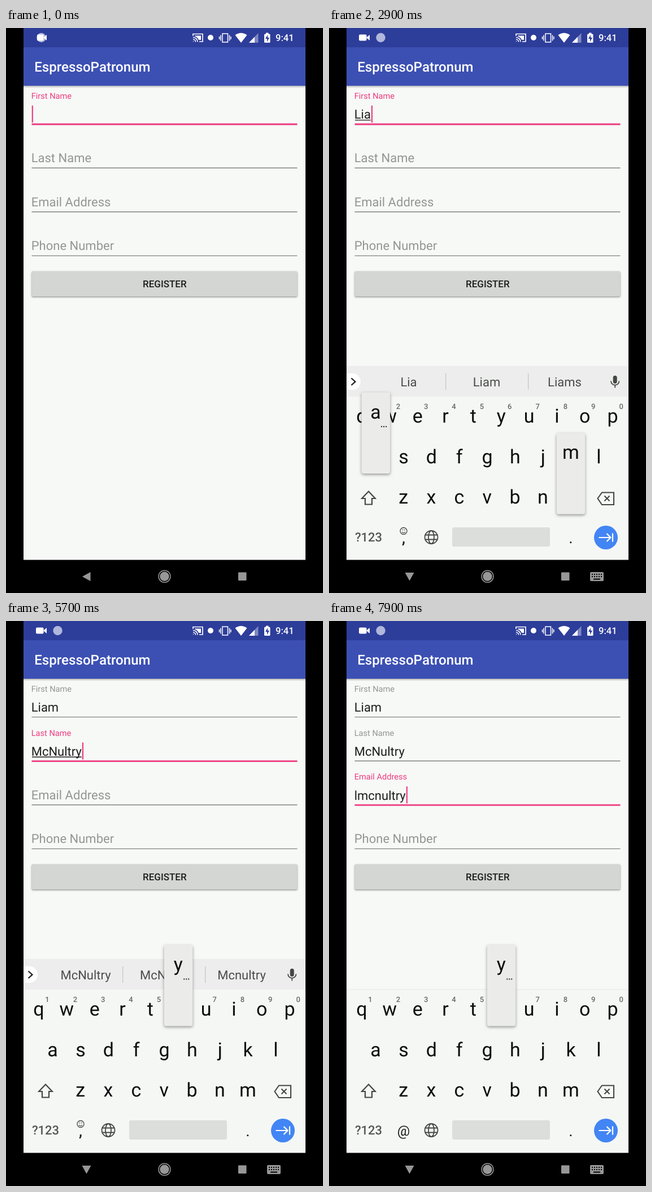
Animation of 561x998 px, one loop 8 s. Source, as an HTML page with a canvas:

```html
<!DOCTYPE html>
<html lang="en">
<head>
<meta charset="utf-8">
<title>Registration form</title>
<style>
html, body { margin: 0; width: 561px; height: 998px; overflow: hidden; background: #000; }
canvas { display: block; }
</style>
</head>
<body>
<canvas id="stage" width="561" height="998"></canvas>
<script>
const ctx = document.getElementById('stage').getContext('2d');
ctx.textRendering = 'geometricPrecision';
const LOOP = 8000, PITCH = 77.6, KEY = 49.35, ROW = 71.6;
const HOLD = 200, LAG = 100;
const PINK = '#ee3b7f', GRAY = '#949694', INK = '#1c1d1c', ICON = '#444644';

// keys: the moment each character of the text goes down
const fields = [
  { label: 'First Name', focus: -200, text: 'Liam', keys: [2300, 2550, 2750, 2900] },
  { label: 'Last Name', focus: 3400, text: 'McNultry', keys: [4100, 4300, 4800, 5000, 5150, 5250, 5400, 5600] },
  { label: 'Email Address', focus: 5950, text: 'lmcnultry', keys: [6500, 6650, 6800, 7000, 7250, 7400, 7500, 7600, 7800] },
  { label: 'Phone Number', focus: Infinity, text: '', keys: [] }
];
const rows = [
  { chars: 'qwertyuiop', x: 58 },
  { chars: 'asdfghjkl', x: 82.6 },
  { chars: 'zxcvbnm', x: 131.7 }
];
const guesses = {
  '': ["I'm", 'I', 'Thanks'],
  L: ['L', 'Love', 'Let'],
  Li: ['Li', 'Like', 'Life'],
  Lia: ['Lia', 'Liam', 'Liams'],
  Mc: ['Mc', 'MC', "McTarrow's"],
  McNultry: ['McNultry', 'McNutry', 'Mcnultry']
};

const ramp = (t, start, length) => Math.min(1, Math.max(0, (t - start) / length));
const mix = (a, b, p) => a + (b - a) * p;
const within = (t, a, b) => t >= a && t < b;

function text(s, x, y, size, color, align = 'left', weight = 400) {
  ctx.font = `${weight} ${size}px Roboto, sans-serif`;
  ctx.textAlign = align;
  ctx.fillStyle = color;
  ctx.fillText(s, x, y);
}
function rect(x, y, w, h, color, r = 0) {
  ctx.fillStyle = color;
  ctx.beginPath();
  ctx.roundRect(x, y, w, h, r);
  ctx.fill();
}
function disc(x, y, r, color) {
  rect(x - r, y - r, 2 * r, 2 * r, color, r);
}
function fill(d, color) {
  ctx.fillStyle = color;
  ctx.fill(new Path2D(d));
}
function stroke(d, color, width) {
  ctx.strokeStyle = color;
  ctx.lineWidth = width;
  ctx.stroke(new Path2D(d));
}
function raised(blur, dy, draw) {
  ctx.save();
  ctx.shadowColor = 'rgba(0,0,0,.4)';
  ctx.shadowBlur = blur;
  ctx.shadowOffsetY = dy;
  draw();
  ctx.restore();
}

function statusBar(t) {
  rect(31, 0, 499, 34, '#2d3d9a');
  const p = ramp(t, 50, 200);
  disc(mix(62.5, 91.5, p), 17, 8.2, '#b0b7dc');
  const cam = mix(2, 0, p);
  rect(53 + cam, 11.5, 13.5 - cam, 11, '#fff', 2);
  fill('M66 17L72 12V22Z', '#fff');

  stroke('M331 14V10.5H348V24H342M331 23.5h1M331 20a4.5 4.5 0 0 1 4.5 4.5M331 16.5a8 8 0 0 1 8 8', '#fff', 1.7);
  fill('M334 13.5H345V21H341Q339 16 334 14.5Z', '#fff');
  disc(362, 17, 5, '#fff');
  stroke('M383 10H392.5V25H383ZM380 12.5V22.5M395.5 12.5V22.5M377.6 15V20M397.9 15V20', '#fff', 1.5);
  fill('M416 26L405.5 12.5Q416 5 426.5 12.5Z', '#fff');
  fill('M430 26L446.5 9V26Z', '#7d88c1');
  fill('M430 26L440 15.7V26Z', '#fff');
  rect(457, 10.5, 10.5, 15.5, '#fff', 1.5);
  rect(460, 8.5, 4.5, 3, '#fff');
  fill('M463 12L459 19H462V24.5L466 17H463Z', '#2d3d9a');
  text('9:41', 477, 23, 16.6, '#fff', 'left', 500);
}

function appBar() {
  const shade = ctx.createLinearGradient(0, 102, 0, 106);
  shade.addColorStop(0, 'rgba(0,0,0,.28)');
  shade.addColorStop(1, 'rgba(0,0,0,0)');
  rect(31, 102, 499, 4, shade);
  rect(31, 34, 499, 68, '#3c50b3');
  text('EspressoPatronum', 50.2, 77, 24.1, '#fff', 'left', 500);
}

const typed = (field, t) => field.text.slice(0, field.keys.filter(k => k + LAG <= t).length);

function drawField(field, i, t, active) {
  const y = i * PITCH, value = typed(field, t);
  const up = ramp(t, field.focus, 180);
  text(field.label, 44.7, y + mix(159.6, 125, up), mix(22, 14.6, up), active ? PINK : GRAY);
  const line = active ? 2.8 : 1.4;
  rect(45.5, y + (active ? 170 : 169.6) - line / 2, 470, line, active ? PINK : '#828482');
  text(value, 44.7, y + 160.4, 22, INK);
  if (!active) return;
  const end = 44.7 + ctx.measureText(value).width;
  if (value && i < 2) rect(46, y + 162, end - 46, 1.3, INK);
  const last = value ? field.keys[value.length - 1] + LAG : field.focus;
  if (Math.floor((t - last) / 500) % 2 === 0) rect(end + 1, y + 137, 2.2, 30, PINK);
}

function form(t, current) {
  fields.forEach((f, i) => drawField(f, i, t, f === current));
  raised(3, 1.5, () => rect(45.5, 429.5, 470, 44.5, '#d4d6d3', 2));
  text('REGISTER', 280.8, 458, 17, INK, 'center', 500);
}

function suggestions(value) {
  rect(31, 597, 499, 54, '#ecedec');
  rect(31, 610, 25, 29, '#fff', [0, 14.5, 14.5, 0]);
  stroke('M39.5 618.5L46.5 624.7L39.5 631', '#222', 2.3);
  const words = guesses[value] || [value, value.toUpperCase(), value[0] + value.slice(1).toLowerCase()];
  words.forEach((w, i) => text(w, 141 + 138 * i, 633, 22, '#4a4c4a', 'center'));
  rect(206, 610, 1.3, 29, '#c6c8c6');
  rect(352, 610, 1.3, 29, '#c6c8c6');
  rect(502.7, 614, 7, 14, ICON, 3.5);
  stroke('M499 623.5a7.2 7.2 0 0 0 14.4 0M506.2 630V635.5', ICON, 1.8);
}

function letterKeys(shift) {
  rows.forEach((row, r) => [...row.chars].forEach((c, i) => {
    const x = row.x + KEY * i;
    text(shift ? c.toUpperCase() : c, x, (shift ? 700 : 697) + ROW * r, 34, '#0c0d0c', 'center');
    if (r === 0) text((i + 1) % 10, x + 15, 673.3, 13, '#666866', 'center', 500);
  }));
}

function controls(t, shift, email) {
  if (within(t, 4500, 4700)) rect(37, 802, 66, 56, '#dcdedc', 1);
  if (shift) fill('M70 819L83.5 832H77V842.5H63V832H56.5Z', ICON);
  else stroke('M70 818.5L81.8 831H76V841.5H64V831H58.2Z', ICON, 2.2);
  stroke('M475.5 831L483 820.5H504V842H483ZM487.5 826.5L496.5 835.5M496.5 826.5L487.5 835.5', ICON, 2.1);

  text('?123', 70, 907, 22, '#555755', 'center', 500);
  if (email) text('@', 132, 909, 25, INK, 'center');
  else {
    stroke('M126 888.5a6 6 0 1 0 12 0a6 6 0 1 0 -12 0M128.8 890a3.5 3 0 0 0 6.4 0M129.5 886.5h1.6M133 886.5h1.6', ICON, 1.3);
    text(',', 132, 910, 27, INK, 'center', 500);
  }
  stroke('M169.5 899.5a11.5 11.5 0 1 0 23 0a11.5 11.5 0 1 0 -23 0' +
    'M176 899.5a5 11.5 0 1 0 10 0a5 11.5 0 1 0 -10 0M170.5 895.5H191.5M170.5 903.5H191.5', ICON, 1.8);
  rect(218, 882, 173, 34, '#dcdedc', 3);
  text('.', 428, 910, 28, INK, 'center');

  const pressed = fields.some(f => within(t, f.focus - 50, f.focus + 100));
  disc(490, 900, 21, pressed ? '#3871d2' : '#4285f4');
  stroke('M477.5 900H498M491.5 893L498.5 900L491.5 907M502 892.5V907.5', '#fff', 2.2);
}

function popup(char) {
  const key = char.toLowerCase();
  const r = rows.findIndex(row => row.chars.includes(key));
  const x = rows[r].x + KEY * rows[r].chars.indexOf(key);
  const y = 572 + ROW * r;
  raised(5, 2, () => rect(x - 25, y, 50.5, 143.5, '#ebecea', 4));
  text(char, x, y + 46, 34, '#0c0d0c', 'center');
  if (r === 0 || 'ascn'.includes(key))
    for (let i = 0; i < 3; i++) rect(x + 9.5 + 4 * i, y + 59.5, 2, 2, '#222');
}

function keyboard(t, current, show) {
  if (!show) return;
  const email = current === fields[2], value = typed(current, t);
  const shift = !email && (!value || within(t, 4500, 4900));
  ctx.save();
  ctx.globalAlpha = show;
  ctx.translate(0, (1 - show) * 70);
  rect(31, 651, 499, 290, '#f5f7f5');
  if (email) rect(31, 650, 499, 1.5, '#eceeec');
  else suggestions(value);
  letterKeys(shift);
  controls(t, shift, email);
  current.keys.forEach((k, i) => { if (within(t, k, k + HOLD)) popup(current.text[i]); });
  ctx.restore();
}

function navBar(show) {
  const c = '#979797';
  rect(0, 939.5, 561, 58.5, '#000');
  ctx.save();
  ctx.translate(142.5, 969);
  ctx.rotate(-Math.PI / 2 * show);
  fill('M-7.5 0L7 -8V8Z', c);
  ctx.restore();
  disc(280.5, 968.7, 8.2, c);
  stroke('M270 968.7a10.5 10.5 0 1 0 21 0a10.5 10.5 0 1 0 -21 0', c, 1.5);
  rect(411, 961.5, 14.5, 14.5, c, 1);
  ctx.globalAlpha = show;
  rect(462, 961, 24, 16, c, 2);
  for (let i = 0; i < 10; i++) rect(465 + 4 * (i % 5), 964 + 4 * Math.floor(i / 5), 2, 2, '#000');
  rect(468, 972.5, 12, 2, '#000');
  ctx.globalAlpha = 1;
}

function frame(now) {
  const t = now % LOOP;
  const current = fields.filter(f => f.focus <= t).pop();
  const show = ramp(t, 1550, 200);
  rect(0, 0, 561, 998, '#000');
  rect(31, 0, 499, 940, '#f7f9f7');
  statusBar(t);
  appBar();
  form(t, current);
  keyboard(t, current, show);
  navBar(show);
  requestAnimationFrame(frame);
}
requestAnimationFrame(frame);
</script>
</body>
</html>
```
